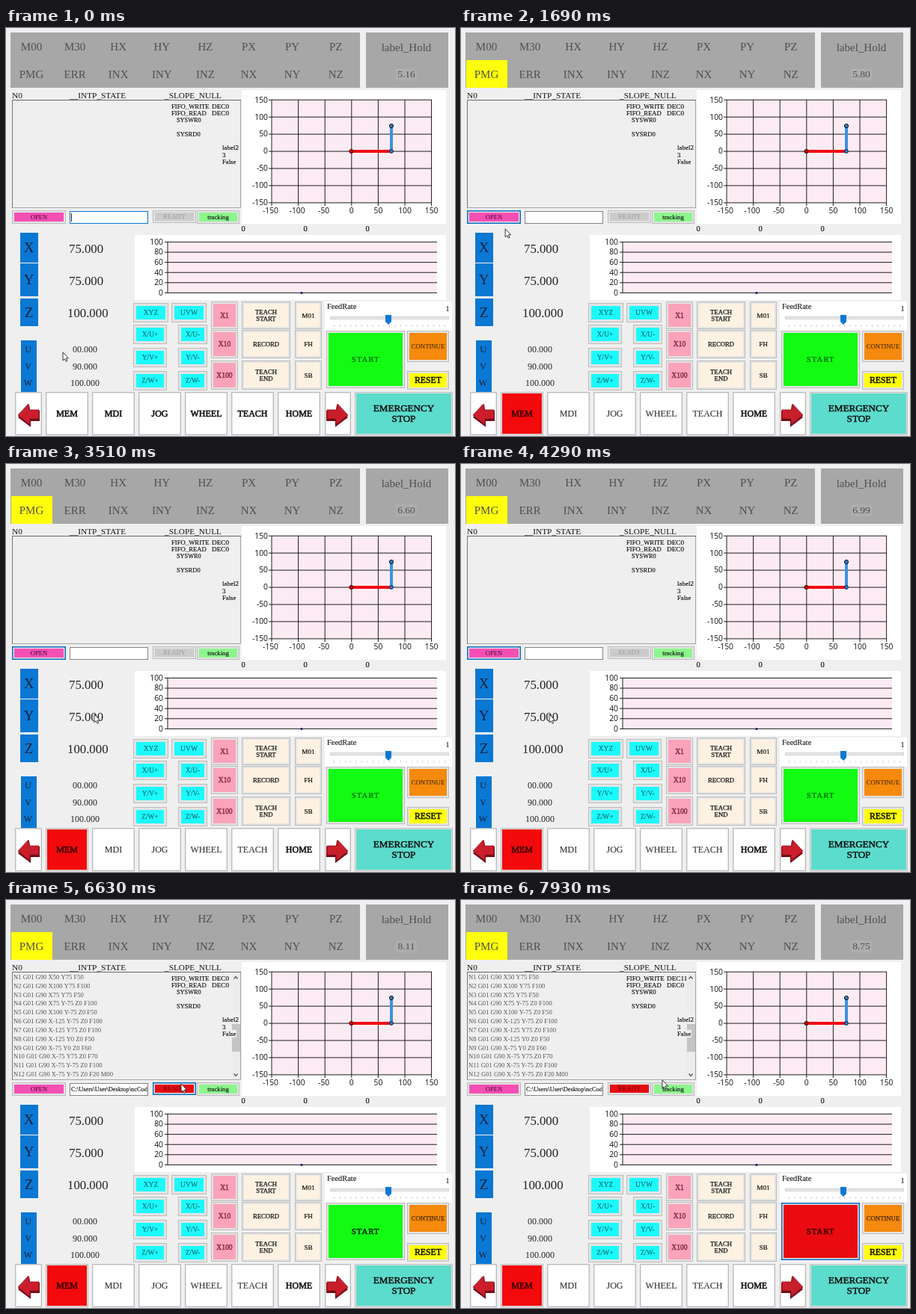
Animation, 600 px wide and 546 px high, one loop 8 s. Source, as an HTML page with a canvas:

```html
<!DOCTYPE html>
<html lang="en">
<head>
<meta charset="utf-8">
<title>Motion control panel</title>
<style>
  html, body { margin: 0; width: 100%; height: 100%; overflow: hidden; background: #f0eff0; }
  canvas { display: block; width: 600px; height: 546px; }
</style>
</head>
<body>
<canvas id="stage" width="600" height="546"></canvas>
<script>
const ctx = document.getElementById('stage').getContext('2d');
const LOOP = 8000;
const SERIF = '"Liberation Serif", "Noto Serif", serif';
const SANS = '"Open Sans", "Noto Sans", sans-serif';

// Moments at which the operator's clicks take effect
const MEM_ON = 520, OPEN_ON = 1300, LOADED = 5720, READY_ON = 6500, START_ON = 7410;

const clockKeys = [[0, 5.16], [910, 5.61], [1300, 5.8], [1890, 5.8], [2600, 6.15],
  [4290, 6.99], [5850, 7.73], [6630, 8.11], [7930, 8.75], [8000, 8.78]];
const pointerKeys = [[0, 76, 434], [130, 76, 434], [420, 84, 508], [560, 84, 508], [910, 46, 263],
  [1150, 46, 254], [1500, 46, 254], [2200, 118, 335], [4800, 118, 335], [5450, 436, 328],
  [5850, 436, 328], [6400, 234, 246], [6680, 234, 246], [7250, 470, 436], [7480, 470, 436],
  [7930, 269, 241], [8000, 269, 241]];

const program = ['X50 Y75 F50', 'X100 Y75 F100', 'X75 Y75 F50', 'X75 Y-75 Z0 F100',
  'X100 Y-75 Z0 F50', 'X-125 Y-75 Z0 F100', 'X-125 Y75 Z0 F100', 'X-125 Y0 Z0 F50',
  'X-75 Y0 Z0 F60', 'X-75 Y75 Z0 F70', 'X-75 Y-75 Z0 F100', 'X-75 Y-75 Z0 F20 M00'];

const linear = u => u;
const smooth = u => u * u * (3 - 2 * u);

function track(keys, t, col, ease) {
  let i = 1;
  while (i < keys.length - 1 && t > keys[i][0]) i++;
  const a = keys[i - 1], b = keys[i];
  const u = Math.min(1, Math.max(0, (t - a[0]) / (b[0] - a[0])));
  return a[col] + (b[col] - a[col]) * ease(u);
}

function box(x0, y0, x1, y1, fill) {
  ctx.fillStyle = fill;
  ctx.fillRect(x0, y0, x1 - x0, y1 - y0);
}

function frame(x0, y0, x1, y1, color, width = 1) {
  ctx.strokeStyle = color;
  ctx.lineWidth = width;
  const h = width / 2;
  ctx.strokeRect(x0 + h, y0 + h, x1 - x0 - width, y1 - y0 - width);
}

function line(x0, y0, x1, y1, color, width = 1) {
  ctx.strokeStyle = color;
  ctx.lineWidth = width;
  ctx.beginPath();
  ctx.moveTo(x0, y0);
  ctx.lineTo(x1, y1);
  ctx.stroke();
}

function dot(x, y, r, fill, edge) {
  ctx.beginPath();
  ctx.arc(x, y, r, 0, 7);
  ctx.fillStyle = fill;
  ctx.fill();
  if (edge) {
    ctx.strokeStyle = edge;
    ctx.lineWidth = 1;
    ctx.stroke();
  }
}

function shape(points, fill, edge, width = 1) {
  ctx.beginPath();
  points.forEach(([x, y]) => ctx.lineTo(x, y));
  ctx.closePath();
  ctx.fillStyle = fill;
  ctx.fill();
  if (edge) {
    ctx.strokeStyle = edge;
    ctx.lineWidth = width;
    ctx.stroke();
  }
}

// y is the vertical middle of the capitals; heavy thickens the strokes
function text(s, x, y, size, { align = 'left', color = '#111', family = SERIF, heavy = 0 } = {}) {
  ctx.font = `${size}px ${family}`;
  ctx.textAlign = align;
  ctx.fillStyle = color;
  const base = y + size * 0.33;
  ctx.fillText(s, x, base);
  if (heavy) {
    ctx.strokeStyle = color;
    ctx.lineWidth = heavy;
    ctx.strokeText(s, x, base);
  }
}

const mid = (s, x, y, size, opt) => text(s, x, y, size, { align: 'center', ...opt });

function button(x0, y0, x1, y1, fill, label, size, opt = {}) {
  const { inset = 3, focus = false, step = size + 1 } = opt;
  box(x0, y0, x1, y1, '#e3e3e3');
  frame(x0, y0, x1, y1, focus ? '#0a6cc4' : '#bcbcbc', focus ? 1.5 : 1);
  box(x0 + inset, y0 + inset, x1 - inset, y1 - inset, fill);
  const rows = label.split('\n');
  rows.forEach((s, i) =>
    mid(s, (x0 + x1) / 2, (y0 + y1) / 2 + (i - (rows.length - 1) / 2) * step, size, opt));
}

function statusPanel(t) {
  const ink = { color: '#505050' };
  box(6, 6, 473, 80, '#a7a7a7');
  box(481, 6, 591, 80, '#a7a7a7');
  if (t >= MEM_ON) box(7, 43, 62, 80, '#ffff0c');
  const rows = ['M00 M30 HX HY HZ PX PY PZ', 'PMG ERR INX INY INZ NX NY NZ'];
  rows.forEach((row, r) => row.split(' ').forEach((s, i) =>
    mid(s, 34 + i * 58.1, 25 + r * 37, 15, ink)));
  mid('label_Hold', 535, 26, 15, ink);
  box(521, 54, 549, 70, '#adadad');
  mid(track(clockKeys, t, 1, linear).toFixed(2), 535, 62, 13.5, ink);
}

function scrollBar() {
  box(301, 98, 313, 240, '#ececec');
  box(302, 150, 313, 203, '#c4c4c4');
  [[104, 1], [234, -1]].forEach(([y, d]) => {
    ctx.strokeStyle = '#555';
    ctx.lineWidth = 1.2;
    ctx.beginPath();
    ctx.moveTo(304.5, y + d * 1.5);
    ctx.lineTo(307, y - d * 1.5);
    ctx.lineTo(309.5, y + d * 1.5);
    ctx.stroke();
  });
  // opaque label backgrounds lying over the thumb
  box(288, 149, 313, 166, '#efeff0');
  box(288, 174, 308, 184, '#efeff0');
}

function programPanel(t) {
  text('N0', 8, 90, 11.3);
  text('__INTP_STATE', 85, 90, 11.3);
  text('_SLOPE_NULL', 212, 90, 11.3);
  box(8, 96, 314, 241, '#efeff0');
  frame(8, 96, 314, 241, '#a5a5a5');
  line(8, 96.5, 314, 96.5, '#686868');
  line(8.5, 96, 8.5, 241, '#777');

  if (t >= LOADED) {
    program.forEach((s, i) =>
      text(`N${i + 1} G01 G90 ${s}`, 10, 103 + i * 11.85, 8.6, { color: '#555' }));
    scrollBar();
  }
  const ink = { heavy: 0.15 };
  text('FIFO_WRITE', 221, 105, 8.7, ink);
  text(t >= START_ON ? 'DEC11' : 'DEC0', 275, 105, 9.2, ink);
  text('FIFO_READ', 221, 114, 8.7, ink);
  text('DEC0', 275, 114, 9.2, ink);
  text('SYSWR0', 228, 123.5, 8.3, ink);
  text('SYSRD0', 228, 142, 8.5, ink);
  text('label2', 289, 160.5, 9, ink);
  text('3', 289, 170, 9, ink);
  text('False', 289, 179, 8.7, ink);
}

function fileRow(t) {
  const loaded = t >= LOADED, ready = t >= READY_ON;
  button(8, 244, 80, 262, '#f54fb5', 'OPEN', 8.6, { focus: t >= OPEN_ON && !ready, color: '#400b2c' });
  box(85, 245, 190, 262, '#fff');
  frame(85, 245, 190, 262, t < MEM_ON ? '#0a78d7' : '#858585');
  if (t < MEM_ON) line(87.5, 248, 87.5, 259, '#222');
  if (loaded) {
    ctx.save();
    ctx.beginPath();
    ctx.rect(86, 246, 102.5, 15);
    ctx.clip();
    text('C:\\Users\\User\\Desktop\\ncCode', 87, 253, 8.4, { heavy: 0.15 });
    ctx.restore();
  }
  const fill = ready ? '#e60c12' : loaded ? '#e2e2e2' : '#cbcbcb';
  const color = ready ? '#6c0000' : loaded ? '#222' : '#9a9a9a';
  button(196, 244, 254, 261, fill, 'READY', 8.7, { color, focus: ready && t < START_ON });
  button(255, 244, 312, 262, '#8cf58c', 'tracking', 8.7, { heavy: 0.15 });
}

function planeChart() {
  box(315, 83, 588, 262, '#fff');
  box(355, 96, 569, 234, '#fdebf3');
  for (let i = 0; i <= 6; i++) {
    const x = 355 + i * 35.6, y = 96.2 + i * 22.95, v = i * 50 - 150;
    line(x, 96, x, 238, '#1d1d1d');
    line(351, y, 569, y, '#1d1d1d');
    text(String(-v), 350, y, 10.3, { align: 'right', family: SANS });
    mid(String(v), x - (v < 0 ? 1.5 : 0), 245, 10.3, { family: SANS });
  }
  line(461, 165, 515, 165, '#f00a12', 4);
  line(515, 165, 515, 131, '#3c93df', 4);
  dot(461.5, 165, 2.6, '#d8000c', '#200');
  dot(515, 165, 2.4, '#2f7fd0', '#124');
  dot(515, 131, 2.6, '#2f7fd0', '#111');
}

function feedChart() {
  [317, 400, 483].forEach(x => mid('0', x, 269, 10.5, { heavy: 0.15 }));
  box(172, 277, 588, 364, '#fff');
  box(216, 287, 576, 354, '#fdebf3');
  for (let i = 0; i <= 5; i++) {
    const y = 286.4 + i * 13.6;
    line(212, y, 576, y, '#1d1d1d');
    text(String(100 - i * 20), 210, y, 10.3, { align: 'right', family: SANS });
  }
  line(216, 286, 216, 355, '#1d1d1d');
  dot(395, 354.5, 1.5, '#0a1060');
}

function axes() {
  [['X', 274, 314, '75.000', 84], ['Y', 315, 359, '75.000', 84], ['Z', 362, 399, '100.000', 82]]
    .forEach(([name, y0, y1, value, x]) => {
      box(19, y0, 43, y1, '#0b78d4');
      const y = (y0 + y1) / 2;
      mid(name, 30.5, y, 19, { color: '#12233a' });
      text(value, x, y + 1, 16.8, { color: '#222' });
    });
  box(20, 418, 41, 487, '#0b78d4');
  [['U', '00.000', 89], ['V', '90.000', 89], ['W', '100.000', 86]].forEach(([name, value, x], i) => {
    const y = 430 + i * 22.7;
    mid(name, 29.5, y, 12, { color: '#12233a' });
    text(value, x, y, 12, { color: '#222' });
  });
}

function jogKeys() {
  const teal = { color: '#087078', heavy: 0.15, inset: 4 };
  const cyan = '#1cf9fb';
  button(170, 368, 217, 394, cyan, 'XYZ', 9.6, teal);
  button(221, 368, 268, 394, cyan, 'UVW', 9.6, teal);
  ['X/U', 'Y/V', 'Z/W'].forEach((s, i) => {
    const y = 397 + i * 31;
    button(170, y, 215, y + 26, cyan, s + '+', 9.3, teal);
    button(230, y, 269, y + 26, cyan, s + '-', 9.3, teal);
  });
  const rows = [[366, 403], [404, 442], [445, 484]];
  rows.forEach(([y0, y1], i) => {
    button(274, y0, 310, y1, '#faa3ba', ['X1', 'X10', 'X100'][i], 9.6, { color: '#7d2038', heavy: 0.3 });
    button(315, y0, 380, y1, '#fdf2e2', ['TEACH\nSTART', 'RECORD', 'TEACH\nEND'][i], 8.7, { heavy: 0.25, step: 9.5 });
    button(386, y0, 422, y1, '#fdf2e2', ['M01', 'FH', 'SB'][i], 9.2, { heavy: 0.2 });
  });
}

function runKeys(t) {
  box(426, 366, 596, 405, '#fff');
  text('FeedRate', 429, 373, 10.4, { heavy: 0.1 });
  mid('1', 590, 375, 11);
  box(433, 386, 592, 390, '#e6e9ea');
  frame(433, 386, 592, 390, '#d0d0d0');
  for (let i = 0; i <= 20; i++) line(438.5 + i * 7.4, 397, 438.5 + i * 7.4, 400, '#cfcfcf');
  shape([[507, 384], [515, 384], [515, 393], [511, 397], [507, 393]], '#0b78d4');

  const on = t >= START_ON, armed = t >= READY_ON;
  ctx.letterSpacing = '1px';
  button(428, 405, 533, 482, on ? '#e90b10' : '#13fb13', 'START', 10.8,
    { focus: on, color: on ? '#3a0000' : armed ? '#052405' : '#0d570d', heavy: armed ? 0.5 : 0.15 });
  ctx.letterSpacing = '0px';
  button(536, 405, 592, 447, '#f58a0c', 'CONTINUE', 8.7, { color: '#4a2a04', heavy: armed ? 0.25 : 0.1 });
  button(536, 459, 592, 484, '#ffff0a', 'RESET', 11.8, { heavy: 0.5 });
}

function redArrow(cx, dir) {
  const p = pts => pts.map(([x, y]) => [cx + x * dir, 518 + y]);
  shape(p([[-14, 3], [1, -14], [2, -7], [15, -6], [15, 8], [3, 8], [3, 16]]), '#6d0d18');
  shape(p([[-14, 0], [0, -15], [1, -7], [14, -7], [14, 5], [2, 5], [2, 13]]), '#cb1e2c', '#8e101c', 0.8);
}

function modeKeys(t) {
  const plain = { inset: 2 };
  button(12, 487, 48, 545, '#fff', '', 10, plain);
  button(426, 487, 461, 545, '#fff', '', 10, plain);
  redArrow(30, 1);
  redArrow(443, -1);
  const mem = t >= MEM_ON;
  ['MEM', 'MDI', 'JOG', 'WHEEL', 'TEACH', 'HOME'].forEach((s, i) => {
    const x = 53 + i * 62, lit = mem && i === 0;
    const bold = !mem || i === 0 || i === 5;
    button(x, 487, x + 57, 545, lit ? '#f20a0c' : '#fff', s, 12,
      { ...plain, heavy: bold ? 0.6 : 0.1, color: lit ? '#3c0000' : bold ? '#111' : '#333' });
  });
  button(466, 487, 597, 545, '#5cdccc', 'EMERGENCY\nSTOP', 13.1, { ...plain, heavy: 0.5, step: 14 });
}

function pointer(t) {
  const x = track(pointerKeys, t, 1, smooth), y = track(pointerKeys, t, 2, smooth);
  const tip = [[0, 0], [0, 11], [2.4, 8.8], [4.2, 12.3], [5.8, 11.5], [4.2, 8.1], [7.4, 7.8]];
  shape(tip.map(([a, b]) => [x + a, y + b]), '#fff', '#222', 0.9);
}

function draw(t) {
  box(0, 0, 600, 546, '#f0eff0');
  statusPanel(t);
  programPanel(t);
  fileRow(t);
  planeChart();
  feedChart();
  axes();
  jogKeys();
  runKeys(t);
  modeKeys(t);
  pointer(t);
}

const begin = performance.now();
function tick() {
  draw((performance.now() - begin) % LOOP);
  requestAnimationFrame(tick);
}
tick();
</script>
</body>
</html>
```
